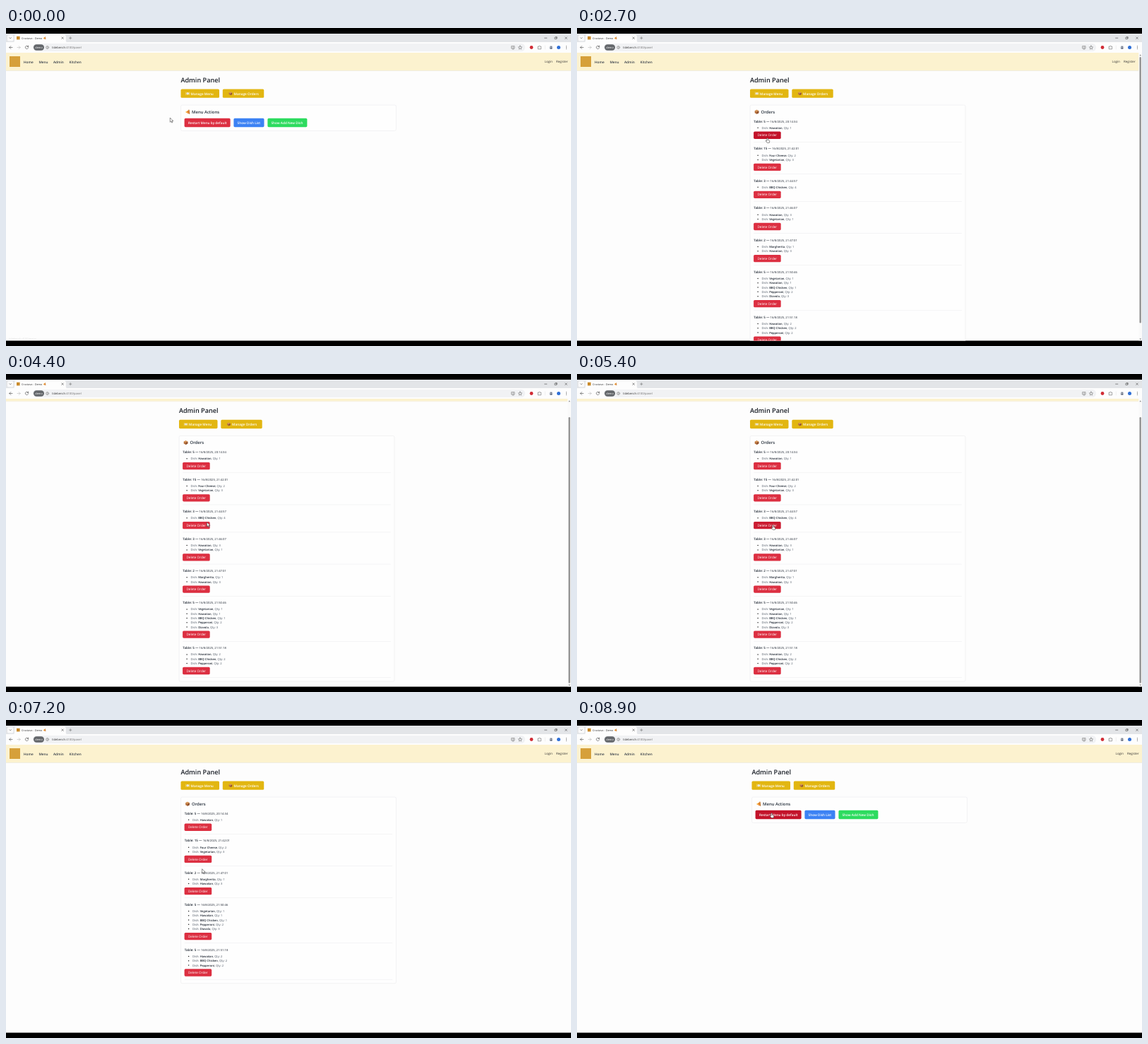
Animation of 800 by 450 pixels, one loop 9 s. Source, as an HTML page:

```html
<!DOCTYPE html>
<html lang="en">
<head>
<meta charset="utf-8">
<title>Admin panel</title>
<style>
html, body { margin: 0; width: 100%; height: 100%; overflow: hidden; background: #000; }
svg { display: block; width: 800px; height: 450px; }
text { font-family: "Open Sans", "Noto Sans", sans-serif; text-rendering: geometricPrecision; white-space: pre; }
</style>
</head>
<body>
<svg viewBox="0 0 800 450" xmlns="http://www.w3.org/2000/svg">
  <defs><clipPath id="view"><rect y="35" width="800" height="407.5"/></clipPath></defs>
  <rect width="800" height="450"/>
  <rect y="35" width="800" height="407.5" fill="#fdfdfd"/>
  <g id="page" clip-path="url(#view)"></g>
  <g id="bar"></g>
  <g id="over"></g>
</svg>
<script>
const LOOP = 9000, STEP = 100, SCROLL = 21.6;
const $ = id => document.getElementById(id);
const clamp = v => Math.max(0, Math.min(1, v));
const ease = v => { v = clamp(v); return v * v * (3 - 2 * v); };

const rect = (x, y, w, h, fill, r = 0, extra = '') =>
  `<rect x="${x}" y="${y}" width="${w}" height="${h}" rx="${r}" fill="${fill}" ${extra}/>`;
const text = (x, y, size, str, fill = '#222', weight = 400) =>
  `<text x="${x}" y="${y}" font-size="${size}" fill="${fill}" font-weight="${weight}">${str}</text>`;
const dot = (x, y, r, fill) => `<circle cx="${x}" cy="${y}" r="${r}" fill="${fill}"/>`;
const line = (d, color = '#444', w = .6) =>
  `<path d="${d}" fill="none" stroke="${color}" stroke-width="${w}" stroke-linecap="round" stroke-linejoin="round"/>`;
const shift = (x, y, body) => `<g transform="translate(${x} ${y})">${body}</g>`;

function mix(a, b, k) {
  const part = (c, i) => parseInt(c.slice(i, i + 2), 16);
  return `rgb(${[1, 3, 5].map(i => Math.round(part(a, i) + (part(b, i) - part(a, i)) * k))})`;
}

// Small pictograms, centred on x, y
const pizza = (x, y, s = 1) => shift(x, y, `<g transform="scale(${s})">` +
  '<path d="M-3 .4L2 -2.8L2.8 2.8Z" fill="#f3b13f"/><path d="M1.4 -3L2.4 -2.8L3.1 2.8L2 2.7Z" fill="#b8692b"/>' +
  dot(.6, -.5, .75, '#d8432c') + dot(.8, 1.5, .6, '#d8432c') + '</g>');
const parcel = (x, y, s = 1) => shift(x, y, `<g transform="scale(${s})">` +
  '<path d="M-2.8 -1.4L0 -2.9L2.8 -1.4V1.5L0 3L-2.8 1.5Z" fill="#b5703c"/>' +
  '<path d="M-2.8 -1.4L0 -2.9L2.8 -1.4L0 0Z" fill="#d99a5c"/><path d="M0 0V3L2.8 1.5V-1.4Z" fill="#8f5230"/></g>');
const plate = (x, y) => dot(x, y, 1.7, '#f6f3ea') + dot(x, y, .9, '#dcd9d0') +
  line(`M${x - 2.4} ${y - 1.6}V${y + 1.7}M${x + 2.4} ${y - 1.6}V${y + 1.7}`, '#f3eee0', .55);

function browser() {
  return rect(0, 8, 800, 12, '#e3e5e8') + rect(0, 20, 800, 15, '#fdfdfd') +
    rect(2, 10, 8.5, 8.5, '#fafafa', 2) + line('M5 13.7l1.2 1.2 1.2-1.2') +
    '<path d="M10.5 20q1.5 0 1.5-2v-6q0-2.4 2.4-2.4h68q2.4 0 2.4 2.4v6q0 2 1.5 2z" fill="#fdfdfd"/>' +
    rect(15, 11.8, 4.6, 4.6, '#c98a2b') + text(22, 15.7, 3.75, 'Crustavo - Demo', '#333') + pizza(54.3, 14.3, .65) +
    line('M78.8 12.9l2.6 2.6m0-2.6l-2.6 2.6') + line('M89.6 14.2h3.2m-1.6-1.6v3.2', '#555', .5) +
    line('M762.6 14.2h3.2') + line('M777.3 13.3h2.2v2.2h-2.2zM778.1 12.6h2.1v2.1', '#333', .5) +
    line('M791.7 12.9l2.6 2.6m0-2.6l-2.6 2.6', '#333', .5) +
    line('M9 27.5H4.8m1.9-1.9l-1.9 1.9 1.9 1.9') +
    line('M16 27.5h4.2m-1.9-1.9l1.9 1.9-1.9 1.9', '#b8b8b8') +
    line('M31.4 26.2a2.2 2.2 0 1 0 .3 1.6M31.6 25v1.5h-1.5') +
    rect(38, 22, 697, 11, '#f1f2f4', 5.5) + rect(39, 23.3, 15, 8.4, '#63666a', 4.2) +
    text(41.3, 29, 3.9, 'demo', '#fff') +
    line('M60.6 27.5a2 2 0 1 1 -4 0a2 2 0 1 1 4 0M58.6 27.4v1.1M58.6 26.4v.1', '#555', .45) +
    text(65, 29, 4.1, 'tidebench<tspan fill="#6b6b6b">:4100/panel</tspan>', '#333') +
    line('M716 25.6h4v3.3h-4zM717 30h2M718 26.4v1.6', '#555', .5) +
    line('M728 25l.8 1.7 1.8.2-1.3 1.3.3 1.8-1.6-.9-1.6.9.3-1.8-1.3-1.3 1.8-.2z', '#555', .5) +
    dot(744, 27.5, 2.4, '#d12c35') +
    line('M753.6 26h1.3q.6-1.5 1.2 0h1.4v1.4q1.2.5 0 1.2v1.2h-3.9z', '#555', .55) +
    line('M763.3 25v5', '#d6d8dc', .4) +
    dot(771.8, 27.5, 2.6, '#c9ced8') + dot(771.8, 26.7, .9, '#586070') + rect(770.3, 28, 3, 1.5, '#586070', .7) +
    dot(782.5, 27.5, 2.5, '#2f6fd6') + [25.7, 27.5, 29.3].map(y => dot(793.4, y, .5, '#444')).join('');
}

// table, time, then dish and quantity pairs
const orders = [
  [5, '20:14:34', 'Hawaiian 1'],
  [15, '21:42:01', 'Four Cheese 2', 'Vegetarian 3'],
  [3, '21:44:57', 'BBQ Chicken 4'],
  [3, '21:46:07', 'Hawaiian 3', 'Vegetarian 1'],
  [2, '21:47:01', 'Margherita 1', 'Hawaiian 3'],
  [5, '21:50:46', 'Vegetarian 1', 'Hawaiian 1', 'BBQ Chicken 1', 'Pepperoni 2', 'Diavola 3'],
  [5, '21:51:18', 'Hawaiian 2', 'BBQ Chicken 2', 'Pepperoni 2']
];
const OPEN = 1600, DROP_A = 5500, DROP_B = 6900, CLOSE = 8200;

const hovers = [
  [1250, 1950, 'orders'], [2350, 3050, 'del0'], [5100, 5500, 'del2'],
  [6150, 7100, 'del2'], [7700, 8350, 'menu'], [8600, 9000, 'restart']
];
const hover = (id, t) => hovers.reduce((k, [a, b, who]) =>
  who === id ? Math.max(k, Math.min(clamp((t - a) / 150), clamp((b - t) / 150 + (b === LOOP ? 1 : 0)))) : k, 0);

const GOLD = ['#e2b611', '#bf8a10'], RED = ['#dc2f41', '#c3132a'];
const button = (x, y, w, h, pair, k) => rect(x, y, w, h, mix(pair[0], pair[1], k), 1.6);

function card(bottom) {
  return rect(247.6, 109, 304.8, bottom - 109, '#fefefe', 2, 'stroke="#e6e7e9" stroke-width=".5"');
}

function menuCard(t) {
  return card(145.4) + pizza(257, 118.7, 1.05) + text(263, 121, 5.95, 'Menu Actions', '#26303c', 600) +
    button(252.6, 127.8, 65, 12.4, RED, hover('restart', t)) +
    text(258, 135.8, 4.7, 'Restart Menu by default', '#fff', 600) +
    rect(322.4, 127.8, 43.1, 12.4, '#3c82f4', 1.6) + text(327.6, 135.8, 4.7, 'Show Dish List', '#fff', 600) +
    rect(370.4, 127.8, 56, 12.4, '#2ddb5f', 1.6) + text(375.5, 135.8, 4.7, 'Show Add New Dish', '#fff', 600);
}

function ordersCard(t) {
  const list = orders.filter((o, i) => !(i === 2 && t >= DROP_A) && !(i === 3 && t >= DROP_B));
  let y = 132, out = '';
  list.forEach(([table, time, ...dishes], i) => {
    out += text(252.8, y + 1.5, 4.5,
      `Table: ${table} — <tspan font-size="4.18" font-weight="400">16/8/2025, ${time}</tspan>`, '#1f2733', 600);
    dishes.forEach((d, j) => {
      const cut = d.lastIndexOf(' '), row = y + 9.25 + j * 6.27;
      out += dot(258.6, row, .75, '#222') + text(264, row + 1.5, 4.1,
        `Dish: <tspan font-weight="600" fill="#1f2733">${d.slice(0, cut)}</tspan>, Qty: ${d.slice(cut + 1)}`, '#46505e');
    });
    y += 38.9 + (dishes.length - 1) * 6.27;
    out += button(252.6, y - 24.3, 38.6, 10.3, RED, hover('del' + i, t)) +
      text(258, y - 17.5, 4.6, 'Delete Order', '#fff', 500) +
      rect(252.8, y - 9.7, 294.4, .45, '#e6e7e9');
  });
  return card(y - 3.9) + parcel(257, 118.7) + text(263, 121, 5.95, 'Orders', '#26303c', 600) + out;
}

function page(t) {
  const listed = t >= OPEN && t < CLOSE, tall = listed && t < DROP_A;
  const dx = tall ? -2.5 : 0;
  const top = tall ? SCROLL * ease((t - 3100) / 400) : 0;
  const nav = [['Home', 25], ['Menu', 46.4], ['Admin', 67], ['Kitchen', 89.5]];
  const head = rect(0, 60, 800, .8, '#eeeadd') + rect(0, 35, 800, 25, '#fcf2cf') + rect(5, 40, 15, 15, '#d6a03a') +
    nav.map(([s, x]) => text(x, 49.6, 4.72, s, '#333b47', 600)).join('') +
    text(762.6 + 2 * dx, 49.4, 4.45, 'Login', '#333') + text(779 + 2 * dx, 49.4, 4.4, 'Register', '#333');
  const body = text(247.4, 77.1, 9.15, 'Admin Panel', '#171c24', 600) +
    button(247.5, 86.4, 54.5, 12.4, GOLD, hover('menu', t)) + plate(257.3, 92.7) +
    text(261.6, 94.6, 4.7, 'Manage Menu', '#fff', 600) +
    button(306.8, 86.4, 58.4, 12.4, GOLD, hover('orders', t)) + parcel(317.9, 92.7, .8) +
    text(322.5, 94.6, 4.75, 'Manage Orders', '#fff', 600) + (listed ? ordersCard(t) : menuCard(t));
  const rail = !tall ? '' : rect(795.2, 35, 4.8, 407.5, '#fafafa') +
    rect(796.5, 41 + top * .93, 2.3, 376.5, '#8d8d8d', 1.1) +
    '<path d="M796.5 39.2h2.4l-1.2-1.8zM796.5 439.4h2.4l-1.2 1.8z" fill="#777"/>';
  return shift(0, -top, head + shift(dx, 0, body)) + rail;
}

// time, x, y of the pointer tip
const path = [
  [0, 232.3, 127], [100, 232.3, 127], [600, 236, 121], [900, 236, 121], [1400, 328, 91], [1850, 328, 91],
  [2600, 269, 156], [2900, 269, 156], [3800, 284.4, 209.8], [4700, 284.4, 209.8], [4900, 277, 214],
  [5600, 277, 214], [6400, 275.4, 241.8], [7000, 275.4, 241.8], [7600, 284, 122], [7900, 291, 92],
  [8200, 291, 92], [8850, 275, 132], [9000, 275, 132]
];
const ARROW = 'M0 0V6.2l1.5-1.3 1 2.2 1-.5-1-2.1h2z';
const HAND = 'M-.2 .6a.75 .75 0 0 1 1.5 0V2.5l1.8 .5q.8 .3 .7 1.1l-.5 2.3h-3.1l-2-2.6q-.2-.8 .6-.6l1 .7z';

function pointer(t) {
  const i = Math.max(1, path.findIndex(p => p[0] >= t));
  const [a, x, y] = path[i - 1], [b, u, v] = path[i];
  const k = ease((t - a) / (b - a));
  const over = hovers.some(([s, e]) => t >= s && t < e);
  return shift(x + (u - x) * k, y + (v - y) * k,
    `<path d="${over ? HAND : ARROW}" fill="#fff" stroke="#222" stroke-width=".5" stroke-linejoin="round"/>`);
}

function status(t) {
  const k = .13 * (1 - clamp(t / 300));
  return k ? `<g opacity="${k}">${text(4, 441, 3.8, 'tidebench:4100/menu', '#333')}</g>` : '';
}

let last = -1;
function frame(now) {
  const t = Math.floor((now % LOOP) / STEP) * STEP;
  if (t !== last) {
    last = t;
    $('page').innerHTML = page(t);
    $('over').innerHTML = status(t) + pointer(t);
  }
  requestAnimationFrame(frame);
}
$('bar').innerHTML = browser();
const start = performance.now();
const tick = now => frame(Math.max(0, now - start));
function run(now) {
  const t = Math.floor((Math.max(0, now - start) % LOOP) / STEP) * STEP;
  if (t !== last) draw(t);
  requestAnimationFrame(run);
}
function draw(t) {
  last = t;
  $('page').innerHTML = page(t);
  $('over').innerHTML = status(t) + pointer(t);
}
run(start);
</script>
</body>
</html>
```
